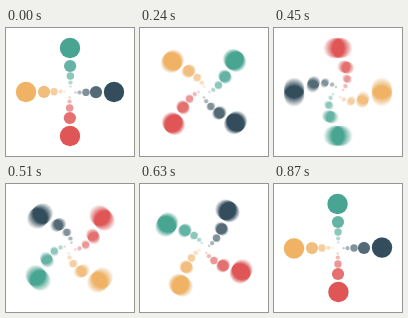
Animation, 128 px wide and 128 px high, one loop 0.9 s. Source, as an HTML page with a canvas:

```html
<!DOCTYPE html>
<html lang="en">
<head>
<meta charset="utf-8">
<title>Spinner</title>
<style>
  html, body { margin: 0; height: 100%; overflow: hidden; background: #fff; }
  canvas { display: block; width: 100vw; height: 100vh; }
</style>
</head>
<body>
<canvas id="stage" width="128" height="128"></canvas>
<script>
const SIZE = 128, LOOP = 900, STEP = 30, SHUTTER = 15, SAMPLES = 16, LEAD = 22;
const colors = ['#47a592', '#334d5c', '#e05555', '#f0b265'];
// Outermost first; each dot runs slightly ahead of the one outside it.
const dots = [
  { distance: 44, radius: 10.2, alpha: 1 },
  { distance: 26, radius: 6.1, alpha: 0.84 },
  { distance: 16, radius: 3.7, alpha: 0.62 },
  { distance: 9.5, radius: 2.1, alpha: 0.42 },
  { distance: 5.5, radius: 1.2, alpha: 0.25 }
];

const stage = document.getElementById('stage').getContext('2d');
const layer = document.createElement('canvas');
layer.width = layer.height = SIZE;
const pen = layer.getContext('2d');

// cubic-bezier(.5, 0, .5, 1)
function ease(x) {
  let low = 0, high = 1;
  for (let i = 0; i < 24; i++) {
    const u = (low + high) / 2;
    if (1.5 * u * (1 - u) + u ** 3 < x) low = u; else high = u;
  }
  return low * low * (3 - 2 * low);
}

function drawPose(time) {
  pen.globalAlpha = 1;
  pen.fillStyle = '#fff';
  pen.fillRect(0, 0, SIZE, SIZE);
  dots.forEach(({ distance, radius, alpha }, i) => {
    const progress = ((time + i * LEAD + LOOP) % LOOP) / LOOP;
    const turn = ease(progress) * 2 * Math.PI;
    pen.globalAlpha = alpha;
    colors.forEach((color, arm) => {
      const angle = turn + (arm - 1) * Math.PI / 2;
      pen.fillStyle = color;
      pen.beginPath();
      pen.arc(SIZE / 2 + distance * Math.cos(angle),
              SIZE / 2 + distance * Math.sin(angle), radius, 0, 2 * Math.PI);
      pen.fill();
    });
  });
}

// Average several poses across the shutter time for motion blur.
function render(now) {
  const time = Math.floor((now % LOOP) / STEP) * STEP;
  for (let k = 0; k < SAMPLES; k++) {
    drawPose(time + ((k + 0.5) / SAMPLES - 0.5) * SHUTTER);
    stage.globalAlpha = 1 / (k + 1);
    stage.drawImage(layer, 0, 0);
  }
}

let start;
function tick(now) {
  start ??= now;
  render(now - start);
  requestAnimationFrame(tick);
}
requestAnimationFrame(tick);
</script>
</body>
</html>
```
